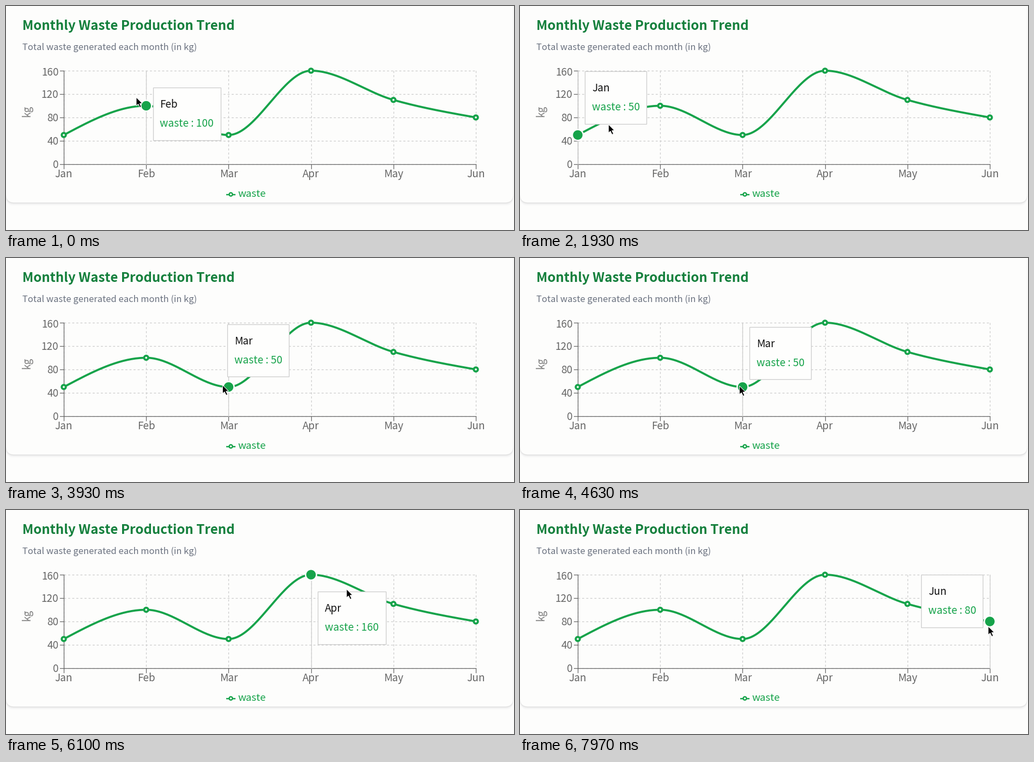
These frames come from a looping animation (932 px wide and 412 px high, 8000 ms). A matplotlib script:

```python
import math
import numpy as np
import matplotlib.pyplot as plt
from matplotlib.animation import FuncAnimation
from matplotlib.patches import Circle, FancyBboxPatch, Polygon, Rectangle

W, H, DPI = 932, 412, 100
FRAMES, STEP = 250, 32
PX = 72 / DPI

BG = "#fdfdfc"
GREEN = "#16a34a"
AXIS = "#666666"
GRID = "#cccccc"
FONT = "Noto Sans CJK JP"

LEFT, RIGHT, TOP, BOTTOM = 106, 862, 119, 291
MONTHS = ["Jan", "Feb", "Mar", "Apr", "May", "Jun"]
KG = [50, 100, 50, 160, 110, 80]
GAP = (RIGHT - LEFT) / 5
xs = LEFT + GAP * np.arange(6)
ys = BOTTOM - (BOTTOM - TOP) * np.array(KG) / 160

fig = plt.figure(figsize=(W / DPI, H / DPI), dpi=DPI, facecolor=BG)
ax = fig.add_axes([0, 0, 1, 1])
ax.set_xlim(0, W)
ax.set_ylim(H, 0)
ax.axis("off")


def label(x, y, text, size, color, ha="left", va="baseline", **kw):
    return ax.text(x, y, text, fontsize=size * PX, color=color, ha=ha, va=va,
                   family=FONT, **kw)


def line(x, y, color, width, **kw):
    return ax.plot(x, y, color=color, lw=width * PX, **kw)[0]


def ring(x, y, r, width, z):
    ax.add_patch(Circle((x, y), r, fc="white", ec=GREEN, lw=width * PX, zorder=z))


def monotone(x, y, n=40):
    """Monotone cubic through the points."""
    s = np.diff(y) / np.diff(x)
    m = np.zeros(len(x))
    for i in range(1, len(x) - 1):
        a, b = s[i - 1], s[i]
        m[i] = (np.sign(a) + np.sign(b)) * min(abs(a), abs(b), abs(a + b) / 4)
    m[0] = (3 * s[0] - m[1]) / 2
    m[-1] = (3 * s[-1] - m[-2]) / 2
    u = np.linspace(0, 1, n)
    px, py = [], []
    for i in range(len(x) - 1):
        h = x[i + 1] - x[i]
        px.append(x[i] + h * u)
        py.append((2 * u**3 - 3 * u**2 + 1) * y[i] + (u**3 - 2 * u**2 + u) * h * m[i]
                  + (3 * u**2 - 2 * u**3) * y[i + 1] + (u**3 - u**2) * h * m[i + 1])
    return np.concatenate(px), np.concatenate(py)


# Card edge with a soft shadow
for bottom, tone in [(367, "#f8f8f8"), (365, "#f1f1f1"), (363.2, "#e2e2e2"),
                     (361.5, BG)]:
    ax.add_patch(FancyBboxPatch((0, -40), 930.5, bottom + 40, fc=tone, ec="none",
                                boxstyle="round,pad=0,rounding_size=15", zorder=0))

label(30, 44, "Monthly Waste Production Trend", 24.05, "#15803d", weight="bold")
label(30, 81, "Total waste generated each month (in kg)", 16.5, "#6b7280")

# Grid and axes
for x in xs:
    line([x, x], [TOP, BOTTOM], GRID, 1.25, dashes=(3, 3), zorder=1)
    line([x, x], [BOTTOM, BOTTOM + 7.5], AXIS, 1.25, zorder=2)
for v in range(0, 161, 40):
    y = BOTTOM - (BOTTOM - TOP) * v / 160
    line([LEFT, RIGHT], [y, y], GRID, 1.25, dashes=(3, 3), zorder=1)
    line([LEFT - 7.5, LEFT], [y, y], AXIS, 1.25, zorder=2)
    label(96.5, max(y, TOP + 2) + 7.3, str(v), 19, AXIS, "right")
line([LEFT, LEFT], [TOP, BOTTOM], AXIS, 1.25, zorder=2)
line([LEFT, RIGHT], [BOTTOM, BOTTOM], AXIS, 1.25, zorder=2)
for x, m in zip(xs, MONTHS):
    label(x, 315, m, 19, AXIS, "center")
label(39, 193.5, "kg", 19, "#808080", "center", "center", rotation=90)

# Series and legend
line(*monotone(xs, ys), GREEN, 3.75, zorder=4)
for x, y in zip(xs, ys):
    ring(x, y, 3.75, 3.75, 5)
line([404, 421], [346.5, 346.5], GREEN, 2.4, solid_capstyle="butt")
ring(412.5, 346.5, 3, 2.4, 5)
label(425.5, 351, "waste", 18.6, GREEN)

# Moving parts
guide = line([0, 0], [TOP, BOTTOM], GRID, 1.25, zorder=3)
dot = ax.add_patch(Circle((0, 0), 10, fc=GREEN, ec="white", lw=2.5 * PX, zorder=6))
box = ax.add_patch(Rectangle((0, 0), 1, 96.5, fc="#fefefd", ec=GRID,
                             lw=1.25 * PX, zorder=7))
name = label(0, 0, "", 19, "#111111", zorder=8)
value = label(0, 0, "", 19.2, GREEN, zorder=8)
hover = [guide, dot, box, name, value]

ARROW = np.array([(0, 0), (0, 15.5), (3.6, 12.4), (6.6, 18.6), (9.2, 17.4),
                  (6.3, 11.3), (11, 11)])
pointer = ax.add_patch(Polygon(ARROW, fc="black", ec="white", lw=0.9 * PX, zorder=9))

# Pointer stops: ms, x, y
STOPS = [(0, 239, 168), (750, 102, 239), (1000, 101, 241), (1450, 102, 241),
         (2500, 245, 186), (2670, 247, 185), (3260, 249, 184), (3930, 398, 234),
         (4250, 402, 236), (4810, 403, 235), (5150, 567, 124), (5750, 569, 126),
         (6550, 720, 179), (6730, 721, 180), (7000, 722, 181), (7650, 858, 212),
         (7970, 859, 214)]


def pointer_at(t):
    for (t0, x0, y0), (t1, x1, y1) in zip(STOPS, STOPS[1:]):
        if t <= t1:
            u = (t - t0) / (t1 - t0)
            u = u * u * (3 - 2 * u)
            return x0 + (x1 - x0) * u, y0 + (y1 - y0) * u
    return STOPS[-1][1:]


def box_width(i):
    return 124.5 if KG[i] > 99 else 113.5


def box_goal(i, y):
    """Beside the active point, flipped when it would leave the plot."""
    w, h, off = box_width(i), 96.5, 12.5
    gx = xs[i] + off
    if gx + w > RIGHT:
        gx = xs[i] - off - w
    gy = y + off
    if gy + h > BOTTOM:
        gy = max(y - off - h, TOP)
    return np.array([gx, gy])


def simulate():
    pos = np.array([269.5, 150.0])
    ease = 1 - math.exp(-STEP / 125)
    states = []
    for f in range(FRAMES):
        x, y = pointer_at(f * STEP)
        i = int(np.clip(round((x - LEFT) / GAP), 0, 5))
        shown = x >= LEFT
        if shown and f:
            pos = pos + (box_goal(i, y) - pos) * ease
        states.append((x, y, i, shown, *pos))
    return states


STATES = simulate()


def draw(f):
    x, y, i, shown, bx, by = STATES[f]
    pointer.set_xy(ARROW + (x, y))
    for part in hover:
        part.set_visible(shown)
    guide.set_xdata([xs[i], xs[i]])
    dot.center = xs[i], ys[i]
    box.set_xy((bx, by))
    box.set_width(box_width(i))
    name.set_text(MONTHS[i])
    name.set_position((bx + 13, by + 37))
    value.set_text(f"waste : {KG[i]}")
    value.set_position((bx + 13, by + 72))
    return hover + [pointer]


anim = FuncAnimation(fig, draw, frames=FRAMES, interval=STEP, repeat=True,
                     repeat_delay=0, init_func=lambda: draw(0), blit=False)
plt.show()
```
